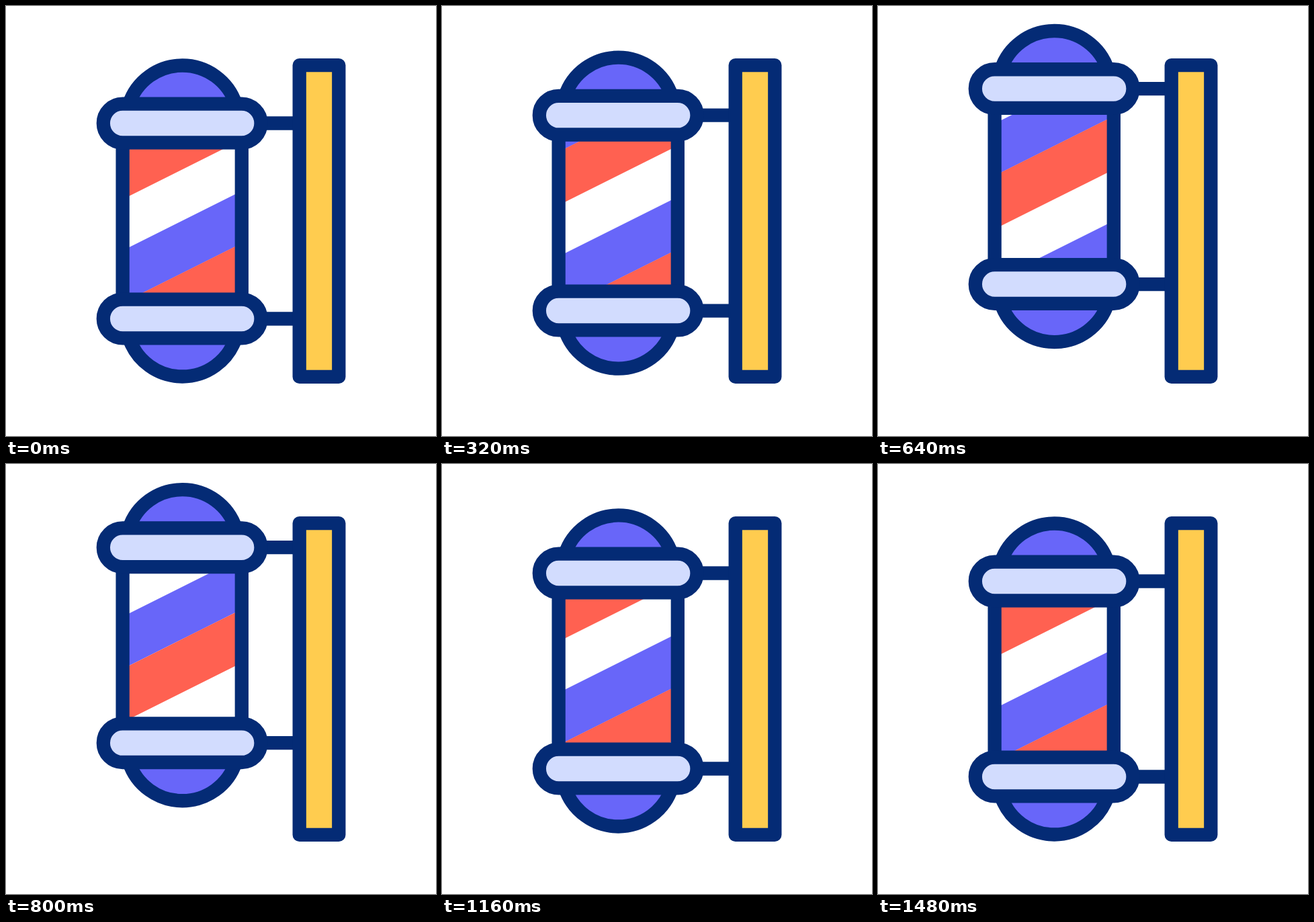
Animation, 640 px wide and 640 px high, one loop 1.52 s. Source, as an HTML page:

```html
<!DOCTYPE html>
<html lang="en">
<head>
<meta charset="utf-8">
<title>Barber pole</title>
<style>
  html, body { margin: 0; width: 100%; height: 100%; overflow: hidden; background: #fff; }
  svg { display: block; width: 100vw; height: 100vh; }
  .line { stroke: #042b75; stroke-width: 20.3; stroke-linecap: round; stroke-linejoin: round; fill: none; }
  .violet { fill: #6866f9; }
  .pale { fill: #d2dcfe; }
  .gold { fill: #ffcc4f; }
  .red { fill: #ff6151; }
</style>
</head>
<body>
<svg viewBox="0 0 640 640">
  <defs>
    <clipPath id="glass"><rect x="178" y="204" width="168" height="232"/></clipPath>
    <g id="cap">
      <path class="line violet" d="M183 146A83.7 83.7 0 0 1 342 146"/>
      <path class="line" d="M380 174.5H432"/>
      <rect class="line pale" x="144.8" y="145.7" width="234.7" height="57.7" rx="28.85"/>
    </g>
  </defs>
  <g id="pole">
    <g clip-path="url(#glass)"><g id="stripes"></g></g>
    <path class="line" d="M173.6 200V440M350.8 200V440"/>
    <use href="#cap"/>
    <use href="#cap" transform="matrix(1 0 0 -1 0 640)"/>
  </g>
  <rect class="line gold" x="436.7" y="88.1" width="58.6" height="463.8"/>
</svg>
<script>
const LOOP = 1520, STEP = 40, HALF = 700;
const RISE = 52, PERIOD = 233.5;
const pole = document.getElementById('pole');
const stripes = document.getElementById('stripes');

// Eases 0 to 1 like cubic-bezier(x1, 0, x2, 1).
function ease(x, x1, x2) {
  if (x <= 0 || x >= 1) return x <= 0 ? 0 : 1;
  let lo = 0, hi = 1, s;
  for (let i = 0; i < 24; i++) {
    s = (lo + hi) / 2;
    const bx = 3 * s * (1 - s) * ((1 - s) * x1 + s * x2) + s ** 3;
    if (bx < x) lo = s; else hi = s;
  }
  return s * s * (3 - 2 * s);
}

function addStripe(color, top, bottom) {
  const p = document.createElementNS('http://www.w3.org/2000/svg', 'path');
  p.setAttribute('class', color);
  p.setAttribute('d', `M174 ${top + 5}L350 ${top - 83}V${bottom - 83}L174 ${bottom + 5}Z`);
  stripes.append(p);
}

for (let k = -2; k < 2; k++) {
  const y = 282.5 + k * PERIOD;
  addStripe('violet', y + 76.3, y + 154.2);
  addStripe('red', y + 154, y + PERIOD);
}

const move = (el, y) => el.setAttribute('transform', `translate(0 ${y.toFixed(2)})`);

// Poses advance 25 times a second; the small lead absorbs timer jitter.
function draw(ms) {
  const t = Math.floor((ms + 8) / STEP) * STEP % LOOP;
  const up = ease(t / HALF, .75, .48);
  const down = ease(t / HALF - 1, .48, .53);
  move(pole, RISE * (down - up));
  move(stripes, PERIOD * ease(t / HALF / 2, .49, .52));
}

const start = performance.now();
function tick() {
  draw(performance.now() - start);
  requestAnimationFrame(tick);
}
tick();
</script>
</body>
</html>
```
